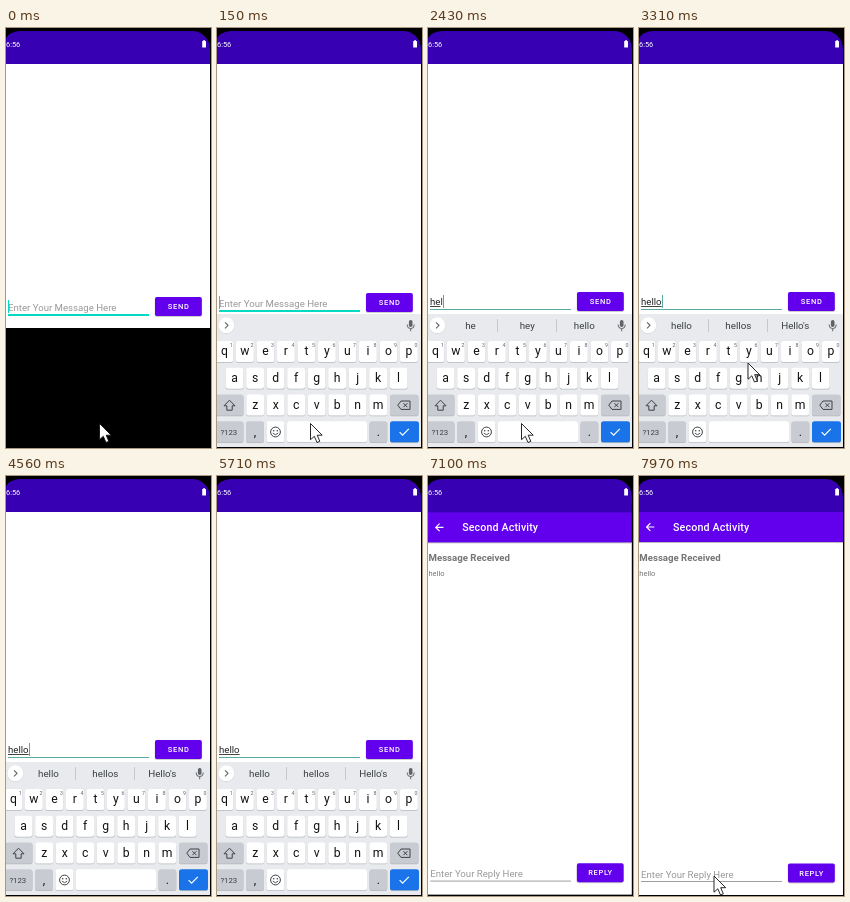
Write an HTML page that moves like this. It is 205 by 420 pixels and loops after 8 s.

```html
<!DOCTYPE html>
<html lang="en">
<head>
<meta charset="utf-8">
<title>Message demo</title>
<style>
  html, body { margin: 0; width: 100%; height: 100%; overflow: hidden; background: #000; }
  svg { display: block; width: 100vw; height: 100vh; font-family: Roboto, "Noto Sans", sans-serif; }
  .mid { text-anchor: middle; }
  .btn { font-size: 7.5px; font-weight: 500; letter-spacing: .67px; fill: #fff; }
  .body { font-size: 9.65px; }
  .letter { font-size: 12.2px; fill: #111; }
  .digit { font-size: 5.2px; fill: #5f6368; }
  .word { font-size: 9.8px; fill: #3c4043; }
</style>
</head>
<body>
<svg id="stage" viewBox="0 0 205 420" preserveAspectRatio="none"></svg>
<script>
const LOOP = 8000;
const stage = document.getElementById('stage');

const rect = (x, y, w, h, fill, r = 0, extra = '') =>
  `<rect x="${x}" y="${y}" width="${w}" height="${h}" rx="${r}" fill="${fill}" ${extra}/>`;
const text = (x, y, s, cls, extra = '') =>
  `<text x="${x}" y="${y}" class="${cls}" ${extra}>${s}</text>`;
const stroke = (d, color, width = 1, extra = '') =>
  `<path d="${d}" fill="none" stroke="${color}" stroke-width="${width}" ${extra}/>`;
const key = (x, y, w, fill = '#fff') =>
  rect(x, y + .8, w, 21, '#b4b8be', 2.6) + rect(x, y, w, 21, fill, 2.6);

function button(x, y, label, id) {
  return rect(x - .3, y + .8, 47.4, 19.2, '#000', 2, 'opacity=".2"') +
    rect(x, y, 46.8, 19, '#6200ee', 1.8, `id="${id}"`) +
    text(x + 23.7, y + 12.2, label, 'btn mid');
}

function letterRow(chars, firstX, y, digits) {
  return [...chars].map((c, i) => {
    const x = firstX + i * 20.5;
    return key(x - 8.9, y, 17.8) + text(x, y + 14.3, c, 'letter mid') +
      (digits ? text(x + 7, y + 6.2, (i + 1) % 10, 'digit mid') : '');
  }).join('');
}

function keyboard() {
  const gray = '#c8ccd2', ink = '#3c4043';
  return rect(0, 286, 204, 133, '#e8eaed') +
    '<circle cx="9.4" cy="297.8" r="8.2" fill="#d2d5d9"/><circle cx="9.4" cy="297.3" r="8" fill="#fff"/>' +
    stroke('M8 294.3l3 3l-3 3', '#5f6368', 1.1) +
    rect(191.9, 292, 3.6, 7, '#5f6368', 1.8) +
    stroke('M190.2 296.5v.6a3.5 3.5 0 0 0 7 0v-.6M193.7 300.7v2.6', '#5f6368') +
    `<g id="dividers">${rect(69, 291, 1, 13, '#c4c7cc')}${rect(128, 291, 1, 13, '#c4c7cc')}</g>` +
    [42.5, 99.3, 156.3].map(x => text(x, 301.3, '', 'word mid')).join('') +
    letterRow('qwertyuiop', 7.4, 313, true) +
    letterRow('asdfghjkl', 17.6, 339.7) +
    letterRow('zxcvbnm', 38.2, 366.5) +
    key(-3, 366.5, 29.5, gray) +
    stroke('M12.5 372.2l-5.5 5.6h2.8v4.4h5.4v-4.4h2.8z', ink, 1, 'stroke-linejoin="round"') +
    key(173, 366.5, 28.5, gray) +
    stroke('M180.8 377.2l3.2-4.2h9v8.4h-9zM186.4 375.2l4 4M190.4 375.2l-4 4', ink) +
    key(-3, 393.3, 29.5, gray) + text(11.8, 407, '?123', 'mid', `font-size="7.8" fill="${ink}"`) +
    key(29, 393.3, 18, gray) + text(38, 407.5, ',', 'letter mid') +
    key(49.5, 393.3, 18) +
    `<circle cx="58.5" cy="404" r="4.9" fill="none" stroke="${ink}"/>` +
    `<circle cx="56.7" cy="402.7" r=".8" fill="${ink}"/><circle cx="60.3" cy="402.7" r=".8" fill="${ink}"/>` +
    stroke('M55.8 405.2q2.7 3 5.4 0', ink, .9) +
    key(70, 393.3, 80) +
    key(152.5, 393.3, 17.8, gray) + text(161.4, 407.5, '.', 'letter mid') +
    key(173, 393.3, 29, '#1a73e8') +
    stroke('M182.6 404.2l3 3l6.2-6.4', '#fff', 1.2);
}

function composeScreen() {
  return `<g id="compose">${rect(0, 36, 204, 264, '#fff')}
    <g id="field">
      ${rect(2, 286, 141, 2, '#03dac5', 0, 'id="line"')}
      ${text(2, 283, 'Enter Your Message Here', 'body', 'fill="#999" id="hint"')}
      ${text(2, 282, '', 'body', 'fill="#222" id="typed"')}
      ${rect(2, 283, 0, 1, '#444', 0, 'id="spell"')}
      ${rect(2, 272, 1, 13, '#03dac5', 0, 'id="caret"')}
      ${button(149, 269, 'SEND', 'send')}
    </g>
    <g id="keys">${keyboard()}</g></g>`;
}

function replyScreen() {
  return `<g id="reply">${rect(0, 27, 205, 393, '#000')}
    <g id="window">
      ${rect(-4, 26, 208, 11, '#3700b3')}
      ${rect(-4, 66, 208, 353, '#fff')}
      ${rect(-4, 66, 208, 1, '#bbb')}
      ${rect(-4, 36, 208, 30, '#6200ee')}
      ${stroke('M15.3 51h-7.6M11.4 47.2l-3.8 3.8l3.8 3.8', '#fff', 1.2)}
      ${text(34, 55, 'Second Activity', '', 'font-size="10.7" font-weight="500" letter-spacing=".13" fill="#fff"')}
      ${text(.3, 84.7, 'Message Received', 'body', 'font-weight="700" fill="#757575"')}
      ${text(.3, 99.8, 'hello', '', 'font-size="7.5" fill="#757575"')}
      ${text(2, 401.5, 'Enter Your Reply Here', 'body', 'fill="#999"')}
      ${rect(2, 405, 141, .8, '#888')}
      ${button(149, 387.5, 'REPLY', 'answer')}
    </g></g>`;
}

stage.innerHTML = rect(0, 0, 205, 420, '#000') +
  rect(0, 3, 204, 33, '#3700b3') + composeScreen() + replyScreen() +
  '<path d="M0 0H205V21H204A18 18 0 0 0 186 3H14Q3 4 0 10Z" fill="#000"/>' +
  text(0, 19.3, '6:56', '', 'font-size="7.4" fill="#fff"') +
  rect(196.2, 13, 3.8, 6.4, '#fff', .5) + rect(197.2, 12.2, 1.8, 1, '#fff') +
  rect(204, 0, 1, 420, '#000') +
  '<path id="mouse" d="M0 0V16.2L3.8 12.8L6.5 19L9.3 17.8L6.7 11.7H11.7Z" fill="#fff" stroke="#111" stroke-width=".9"/>';

const $ = id => document.getElementById(id);
const set = (id, attrs) => { for (const k in attrs) $(id).setAttribute(k, attrs[k]); };
const show = (id, on) => set(id, { display: on ? 'inline' : 'none' });
const words = [...document.querySelectorAll('.word')];

// Value of the last step that has started.
const at = (t, steps) => steps.reduce((v, s) => t >= s[0] ? s[1] : v, steps[0][1]);

const TYPED = [[0, ''], [680, 'h'], [1800, 'he'], [2430, 'hel'], [2680, 'hell'], [2800, 'hello']];
const SPELL = [[0, 0], [1180, 1], [2050, 2], [2680, 3], [3050, 5]];
const WORDS = [[0, '||'], [1180, 'h|hey|hi'], [2050, 'he|hey|hello'],
  [2680, 'hel|hell|hello'], [3050, "hello|hellos|Hello's"]];
const CARET = [[0, 1], [930, 0], [1180, 1], [1550, 0], [1800, 1], [3790, 0], [4320, 1], [5590, 0]];
const MOUSE = [[0, [93.5, 395.5]], [3170, [98, 374]], [3310, [109, 335]], [3430, [126, 309]],
  [3550, [144, 288]], [3670, [155, 277]], [3790, [158.5, 274]], [3930, [160, 274]],
  [4320, [157, 305]], [4440, [150, 352]], [4560, null], [7850, [76, 404]], [7970, [75, 400]]];
const SEND = [[0, '#6200ee'], [5340, '#7a2bf1'], [5590, '#7020f0'], [5710, '#6200ee']];
const ZOOM = [[6730, .987], [6980, .994], [7100, .998], [7220, 1]];
const ADVANCE = [0, 5.4, 10.5, 12.9, 15.2, 20.7];

function draw(t) {
  const second = t >= 6730;
  show('compose', !second);
  show('reply', second);

  if (second) {
    set('window', { transform: `translate(103 239) scale(${at(t, ZOOM)}) translate(-103 -239)` });
  } else {
    const typed = at(t, TYPED), options = at(t, WORDS);
    const settled = t >= 290;
    const teal = settled ? '#5aaaa3' : '#03dac5';
    set('field', { transform: `translate(0 ${at(t, [[0, 0], [150, -4], [290, -5]])})` });
    set('line', { height: settled ? 1 : 2, fill: teal });
    show('hint', !typed);
    $('typed').textContent = typed;
    set('spell', { width: ADVANCE[at(t, SPELL)] });
    show('caret', at(t, CARET));
    set('caret', { x: 2 + Math.round(ADVANCE[typed.length]), fill: teal });
    set('send', { fill: at(t, SEND) });
    show('keys', t >= 150);
    show('dividers', t >= 1180);
    options.split('|').forEach((w, i) => { words[i].textContent = w; });
  }

  const p = at(t, MOUSE);
  show('mouse', p);
  if (p) set('mouse', { transform: `translate(${p})` });
}

const start = performance.now();
function tick() {
  draw((performance.now() - start) % LOOP);
  requestAnimationFrame(tick);
}
tick();
</script>
</body>
</html>
```
